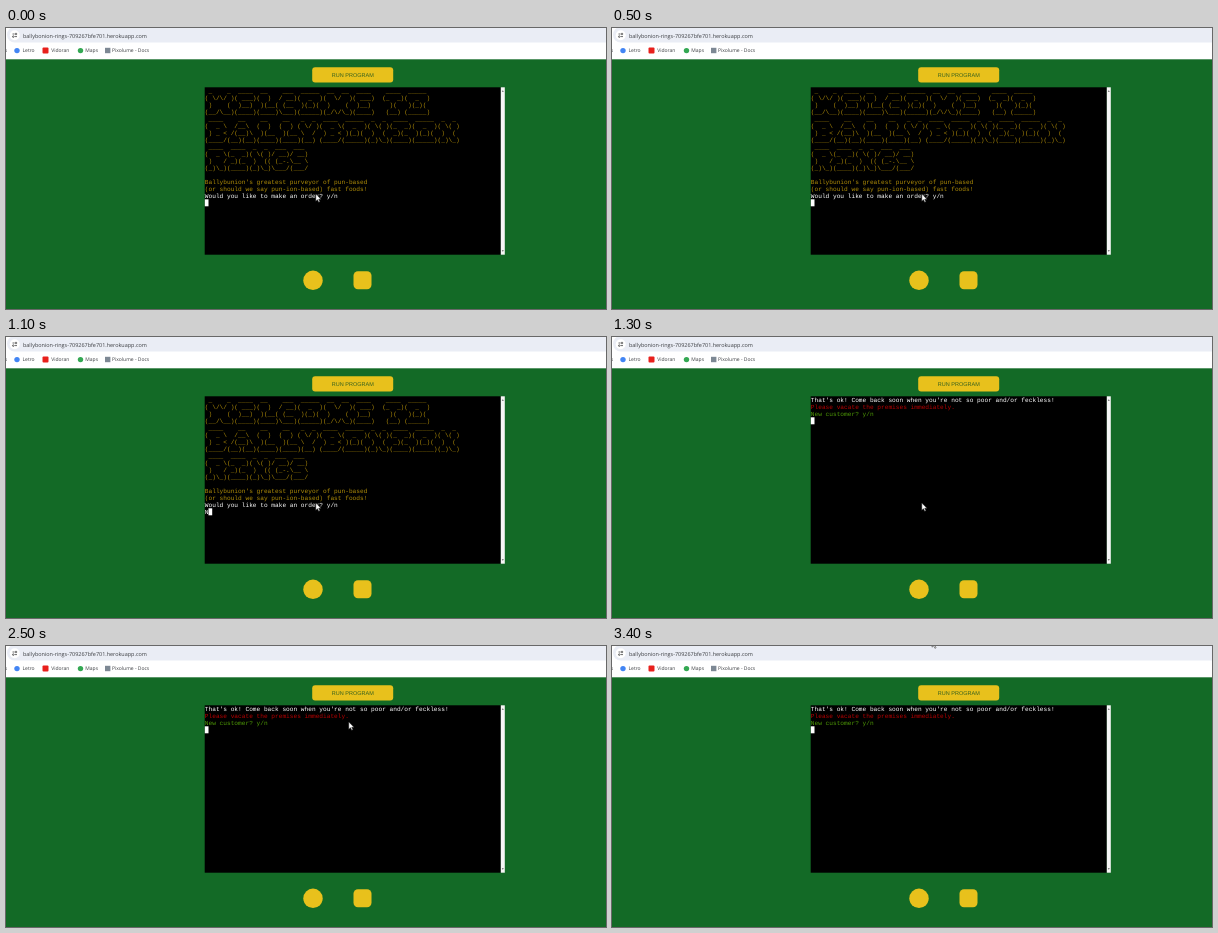
An HTML page for the animation above (3.5 s loop, 600 px wide and 281 px high).

```html
<!DOCTYPE html>
<html lang="en">
<head>
<meta charset="utf-8">
<title>Terminal order form</title>
<style>
  html, body { margin: 0; width: 100%; height: 100%; overflow: hidden; background: #136a26; }
  svg { display: block; width: 100vw; height: 100vh; }
  text { white-space: pre; text-rendering: geometricPrecision; }
  .bar { font-family: "Open Sans", sans-serif; fill: #3c3e42; }
  .term { font: 6.17px "Liberation Mono", monospace; }
  .button { font: 5.5px "Liberation Sans", Arial, sans-serif; fill: #34601f; }
</style>
</head>
<body>
<svg viewBox="0 0 600 281">
  <rect width="600" height="281" fill="#136a26"/>

  <!-- browser bar -->
  <rect width="600" height="31.3" fill="#fff"/>
  <rect x="1" y="-1" width="620" height="15.5" rx="7.7" fill="#eaedf5"/>
  <circle cx="8.7" cy="7.2" r="5" fill="#fff"/>
  <g stroke="#444" stroke-width=".8" fill="none">
    <path d="M6.5 6h2M8.8 8.6h2.2"/>
    <circle cx="10" cy="6" r=".8"/>
    <circle cx="7.3" cy="8.6" r=".8"/>
  </g>
  <text class="bar" x="17" y="9.6" font-size="5.46">ballybonion-rings-709267bfe701.herokuapp.com</text>
  <g class="bar" font-size="5">
    <text x="-1.2" y="24.4">s</text>
    <circle cx="11" cy="22.6" r="2.7" fill="#4285f4"/>
    <text x="16.5" y="24.4">Letro</text>
    <rect x="36.5" y="19.6" width="6" height="6" rx="1" fill="#e8201c"/>
    <text x="45.3" y="24.4">Vidoran</text>
    <circle cx="74.5" cy="22.6" r="2.7" fill="#34a853"/>
    <text x="79.3" y="24.4">Maps</text>
    <rect x="99" y="19.8" width="5.4" height="5.4" fill="#7d8894"/>
    <text x="106" y="24.4">Pixolume - Docs</text>
  </g>

  <!-- page -->
  <g fill="#e8c11c">
    <rect x="306.2" y="39.2" width="81" height="15.4" rx="3"/>
    <circle cx="307" cy="252.3" r="9.7"/>
    <rect x="347.5" y="243.3" width="18" height="18" rx="4.5"/>
  </g>
  <text class="button" x="346.8" y="48.8" text-anchor="middle">RUN PROGRAM</text>
  <rect x="198.7" y="59.3" width="296.1" height="167.4" fill="#000"/>
  <rect x="494.8" y="59.3" width="4" height="167.4" fill="#f6f6f6"/>
  <path d="M495.8 63.7l1-1.5 1 1.5zM495.8 222.3l1 1.5 1-1.5z" fill="#555"/>

  <g class="term" id="welcome"></g>
  <g class="term" id="goodbye"></g>
  <rect id="caret" width="3.7" height="7" fill="#fff"/>
  <path id="pointer" d="M0 0v7.2l1.7-1.5 1.2 2.6 1.2-.5-1.2-2.6h2.3z"
        fill="#fff" stroke="#222" stroke-width=".5"/>
</svg>
<script>
const LEFT = 198.8, TOP = 59.3, COL = 3.702, ROW = 7, LOOP = 3500;
const GOLD = '#b08d08', WHITE = '#fff', RED = '#b80000', GREEN = '#4e9a06';
const get = id => document.getElementById(id);
const welcome = get('welcome'), goodbye = get('goodbye');
const caret = get('caret'), pointer = get('pointer');

const banner = String.raw`
 _    _  ____  __    ___  _____  __  __  ____    ____  _____
( \/\/ )( ___)(  )  / __)(  _  )(  \/  )( ___)  (_  _)(  _  )
 )    (  )__)  )(__( (__  )(_)(  )    (  )__)     )(   )(_)(
(__/\__)(____)(____)\___)(_____)(_/\/\_)(____)   (__) (_____)
 ____    __    __    __   _  _  ____  _____  _  _  ____  _____  _  _
(  _ \  /__\  (  )  (  ) ( \/ )(  _ \(  _  )( \( )(_  _)(  _  )( \( )
 ) _ < /(__)\  )(__  )(__ \  /  ) _ < )(_)(  )  (  _)(_  )(_)(  )  (
(____/(__)(__)(____)(____)(__) (____/(_____)(_)\_)(____)(_____)(_)\_)
 ____  ____  _  _  ___  ___
(  _ \(_  _)( \( )/ __)/ __)
 )   / _)(_  )  (( (_-.\__ \
(_)\_)(____)(_)\_)\___/(___/`.slice(1).split('\n');

function print(screen, row, str, color) {
  const el = document.createElementNS('http://www.w3.org/2000/svg', 'text');
  el.setAttribute('x', LEFT);
  el.setAttribute('y', TOP + row * ROW + 5.5);
  el.setAttribute('fill', color);
  el.textContent = str;
  screen.append(el);
  return el;
}

banner.forEach((line, i) => print(welcome, i, line, GOLD));
print(welcome, 13, "Ballybunion's greatest purveyor of pun-based", GOLD);
print(welcome, 14, '(or should we say pun-ion-based) fast foods!', GOLD);
print(welcome, 15, 'Would you like to make an order? y/n', WHITE);
const answer = print(welcome, 16, 'N', WHITE);

print(goodbye, 0, "That's ok! Come back soon when you're not so poor and/or feckless!", WHITE);
print(goodbye, 1, 'Please vacate the premises immediately.', RED);
print(goodbye, 2, 'New customer? y/n', GREEN);

const show = (el, on) => el.setAttribute('visibility', on ? 'visible' : 'hidden');
const move = (el, x, y) => el.setAttribute('transform', `translate(${x} ${y})`);

// The pointer leaves through the top edge, then peeks back in.
function pointerAt(t) {
  if (t >= 3400) return [320, -6];
  const step = Math.floor((t - 2200) / 100);
  const p = Math.min(1, Math.max(0, step / 6));
  const ease = p * p * (3 - 2 * p);
  return [309.8 + 66 * ease, 166 - 180 * ease];
}

function draw() {
  const t = performance.now() % LOOP;
  const typed = t >= 800, left = t >= 1300;
  show(welcome, !left);
  show(goodbye, left);
  show(answer, typed && !left);
  move(caret, LEFT + (typed && !left ? COL : 0), TOP + ROW * (left ? 3 : 16));
  move(pointer, ...pointerAt(t));
  requestAnimationFrame(draw);
}
draw();
</script>
</body>
</html>
```
